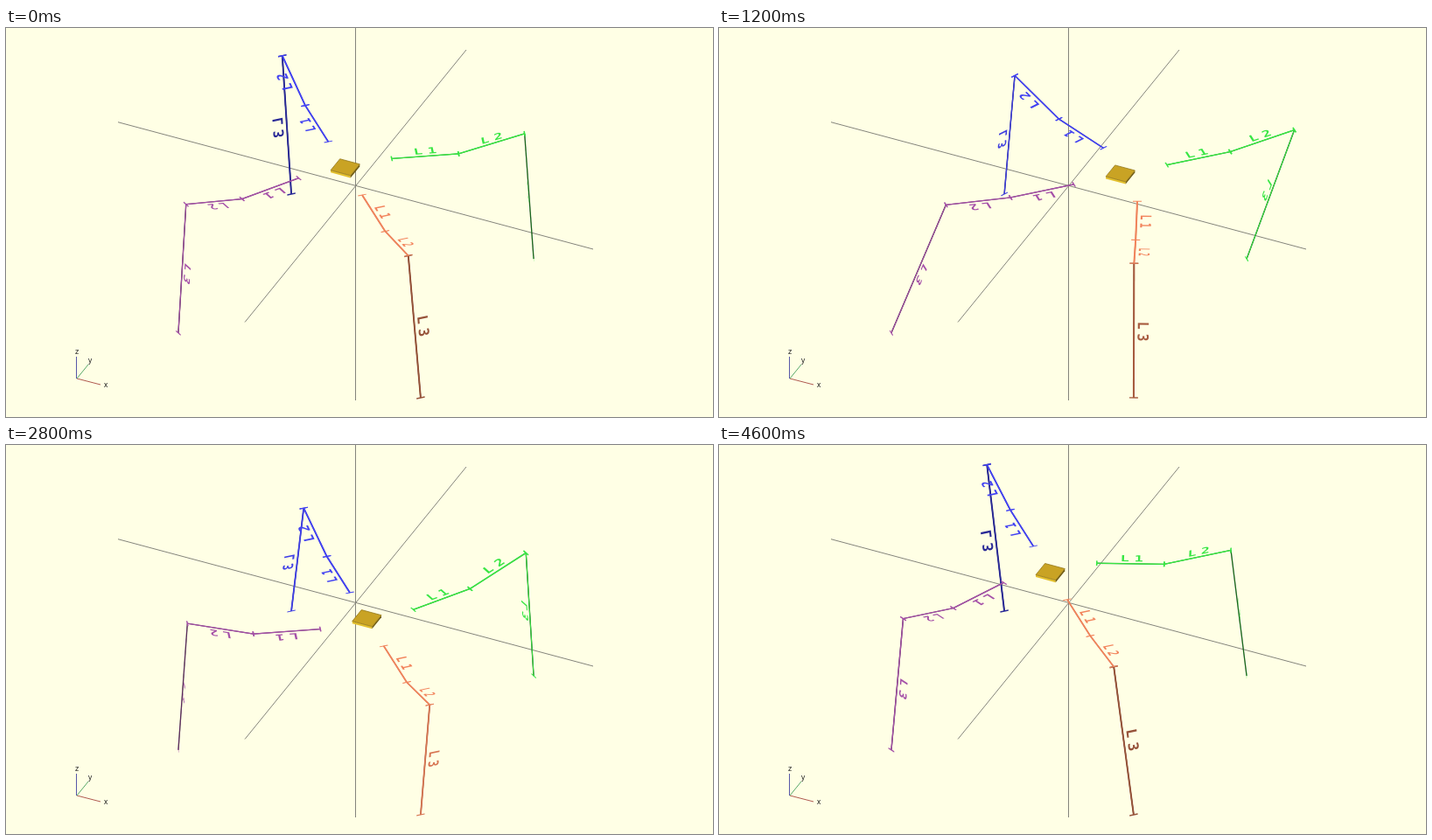
An HTML page with a canvas for the animation above (4800 ms loop, 808 by 445 pixels).

```html
<!DOCTYPE html>
<html lang="en">
<head>
<meta charset="utf-8">
<title>Walking frame</title>
<style>
html, body { margin: 0; width: 100%; height: 100%; overflow: hidden; background: #ffffe5; }
canvas { display: block; width: 808px; height: 445px; }
</style>
</head>
<body>
<canvas id="stage" width="808" height="445"></canvas>
<script>
const ctx = document.getElementById('stage').getContext('2d');
const LOOP = 4800;

// [start ms, phase in degrees]: the first turn sways along (1,1), the second along (1,-1)
const STEPS = [
  [0, 690], [400, 30], [800, 60], [1000, 90], [1200, 120], [1400, 155],
  [1800, 240], [2000, 270], [2400, 330], [2600, 360], [2800, 390],
  [3000, 420], [3400, 480], [3800, 540], [4200, 600], [4600, 660]
];

const SWAY = 51, HIP = 40, FOOT = 152.8, FLOOR = -154.4;
const L1 = 77, L2 = 79, L3 = 176;
const LEGS = [
  { sx: -1, sy: 1, rgb: [66, 66, 242], dim: true },
  { sx: 1, sy: 1, rgb: [56, 230, 68] },
  { sx: -1, sy: -1, rgb: [165, 80, 168] },
  { sx: 1, sy: -1, rgb: [242, 132, 92], dim: true }
];

// Orthographic view: 25 degrees round z, 35 degrees above the floor
const rad = Math.PI / 180;
const C = Math.cos(25 * rad), S = Math.sin(25 * rad);
const E = Math.sin(35 * rad), H = Math.cos(35 * rad);
const dir = ([x, y, z]) => [C * x + S * y, E * (S * x - C * y) - H * z];
const project = v => { const [x, y] = dir(v); return [400 + x, 180 + y]; };
const tint = (rgb, k) => `rgb(${rgb.map(c => Math.round(c * k)).join()})`;

function line(a, b, color, width = 1) {
  ctx.strokeStyle = color;
  ctx.lineWidth = width;
  ctx.beginPath();
  ctx.moveTo(...a);
  ctx.lineTo(...b);
  ctx.stroke();
}

function face(points, color) {
  ctx.fillStyle = color;
  ctx.beginPath();
  points.forEach(p => ctx.lineTo(...project(p)));
  ctx.fill();
}

// A dimension line with end ticks and a label lying in its own plane
function segment(a, b, left, digit, leg) {
  const d = b.map((v, i) => v - a[i]);
  const len = Math.hypot(...d);
  const u = dir(d.map(v => v / len)), w = dir(left);
  const pa = project(a), pb = project(b);
  const shin = digit === '3';
  const shade = shin && leg.dim
    ? Math.min(.95, Math.max(.62, .68 - (pb[0] - pa[0]) * .02)) : 1;
  line(pa, pb, tint(leg.rgb, shin ? .32 : .72), 1.3);
  ctx.save();
  ctx.transform(u[0], u[1], -w[0], -w[1], pa[0], pa[1]);
  ctx.fillStyle = tint(leg.rgb, shade);
  ctx.fillRect(0, -1, len, 2);
  for (const x of [0, len]) ctx.fillRect(x - .8, -5, 1.6, 10);
  ctx.font = 'bold 17px "DejaVu Sans Mono", monospace';
  ctx.fillText('L', len / 2 - 12, -4.5);
  ctx.fillText(digit, len / 2 + 4, -4.5);
  ctx.restore();
}

function drawLeg(leg, bx, by) {
  const hip = [bx + leg.sx * HIP, by + leg.sy * HIP, 0];
  const foot = [leg.sx * FOOT, leg.sy * FOOT, FLOOR];
  const dx = foot[0] - hip[0], dy = foot[1] - hip[1];
  const reach = Math.hypot(dx, dy);
  const cx = dx / reach, cy = dy / reach;
  const out = (r, z) => [hip[0] + cx * r, hip[1] + cy * r, z];

  const rest = reach - L1;
  const span = Math.hypot(rest, FLOOR);
  const lift = Math.acos((L2 * L2 + span * span - L3 * L3) / (2 * L2 * span))
    + Math.atan2(FLOOR, rest);
  const mid = out(L1, 0);
  const knee = out(L1 + L2 * Math.cos(lift), L2 * Math.sin(lift));
  const left = [-cy, cx, 0];
  segment(knee, foot, left, '3', leg);
  segment(mid, knee, left, '2', leg);
  segment(hip, mid, left, '1', leg);
}

function drawBody(bx, by) {
  const h = 12.5, t = 1.6;
  const p = (x, y, z) => [bx + x * h, by + y * h, z * t];
  face([p(-1, -1, 1), p(1, -1, 1), p(1, -1, -1), p(-1, -1, -1)], '#e3c02e');
  face([p(1, -1, 1), p(1, 1, 1), p(1, 1, -1), p(1, -1, -1)], '#6e5a12');
  const top = [p(-1, -1, 1), p(1, -1, 1), p(1, 1, 1), p(-1, 1, 1)];
  face(top, '#c9a324');
  top.forEach((a, i) => line(project(a), project(top[(i + 1) % 4]), '#94781a', .8));
}

function drawAxes() {
  const gray = '#85857c';
  line([128, 107.7], [671, 253], gray);
  line([273, 336.5], [526, 25], gray);
  line([399.5, 0], [399.5, 426], gray);
}

function drawCompass() {
  const o = [81, 401];
  line(o, [108, 408], '#b05a50');
  line(o, [94, 385], '#58a868');
  line([80.5, 401], [80.5, 376], '#5858a8');
  ctx.fillStyle = '#222';
  ctx.font = '8px "DejaVu Sans", sans-serif';
  ctx.textAlign = 'center';
  ctx.fillText('x', 114, 411);
  ctx.fillText('y', 96, 383);
  ctx.fillText('z', 81, 373);
  ctx.textAlign = 'left';
}

function draw(phase) {
  const s = SWAY * Math.sin(phase * rad);
  const bx = s, by = phase <= 360 ? s : -s;
  ctx.fillStyle = '#ffffe5';
  ctx.fillRect(0, 0, 808, 445);
  drawAxes();
  drawLeg(LEGS[0], bx, by);
  drawBody(bx, by);
  LEGS.slice(1).forEach(leg => drawLeg(leg, bx, by));
  drawCompass();
}

const start = performance.now();
let shown = null;
function tick() {
  const t = Math.max(0, performance.now() - start) % LOOP;
  const step = STEPS.findLast(([at]) => at <= t);
  if (step !== shown) draw((shown = step)[1]);
  requestAnimationFrame(tick);
}
tick();
</script>
</body>
</html>
```
